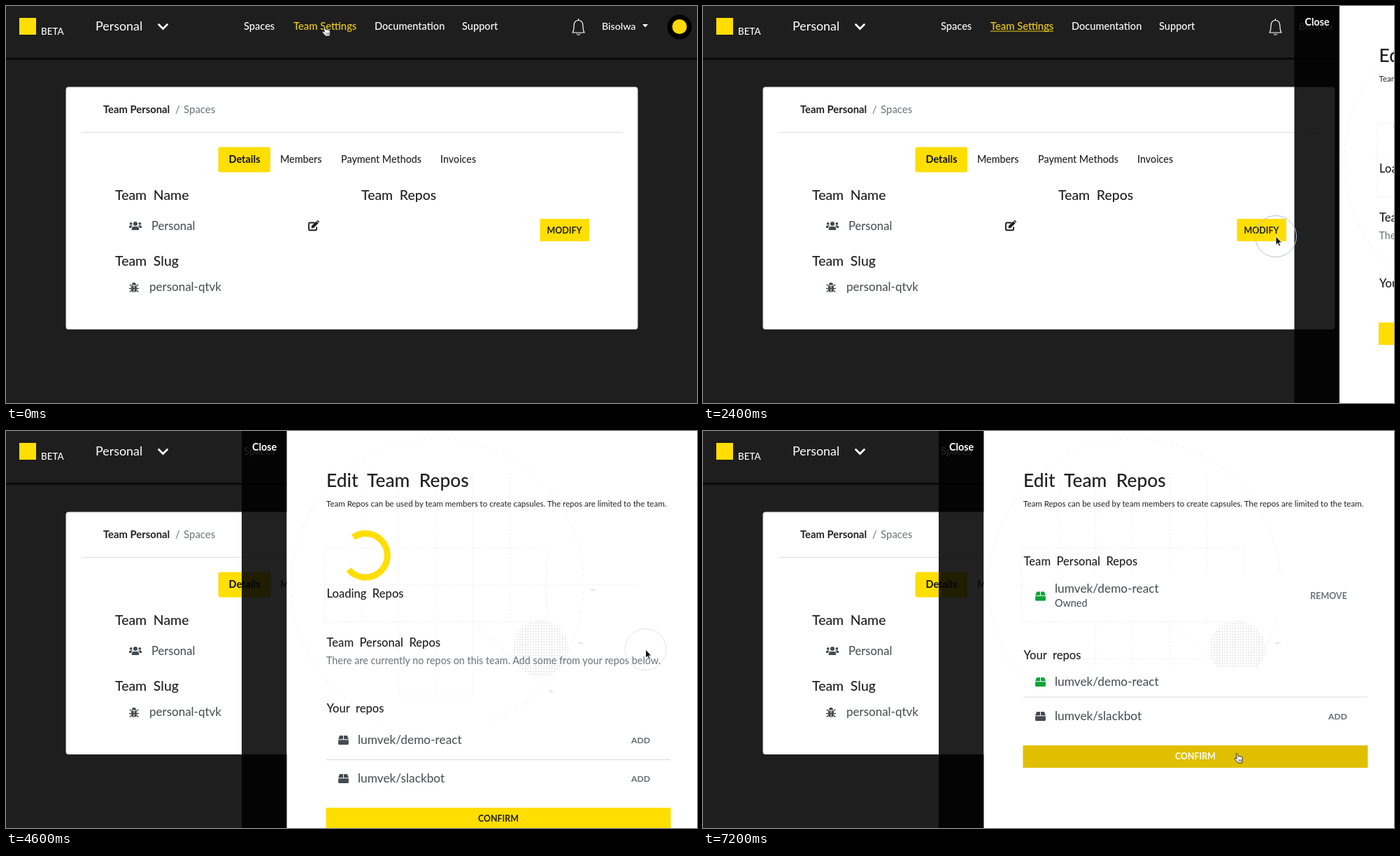
Recreate the animation shown at these times as an HTML page. Size 988 px wide and 567 px high, loop 7400 ms.

```html
<!DOCTYPE html>
<html lang="en">
<head>
<meta charset="utf-8">
<title>Team settings</title>
<style>
  html, body { margin: 0; width: 100%; height: 100%; overflow: hidden; background: #1e1e1e; }
  svg { display: block; width: 988px; height: 567px; }
  text { font-family: Lato, "Open Sans", sans-serif; white-space: pre; }
  .display { font-weight: 500; word-spacing: .25em; }
</style>
</head>
<body>
<svg id="stage" viewBox="0 0 988 567" xmlns="http://www.w3.org/2000/svg">
  <defs>
    <pattern id="dots" width="3.8" height="3.8" patternUnits="userSpaceOnUse">
      <circle cx="1.5" cy="1.5" r=".6" fill="#a8a8a8"/>
    </pattern>
    <linearGradient id="edge" x1="0" y1="0" x2="0" y2="1">
      <stop offset="0" stop-color="#111"/><stop offset=".5" stop-color="#060606"/><stop offset="1" stop-color="#1a1a1a"/>
    </linearGradient>
  </defs>
  <g id="page"></g>
  <g id="drawer"></g>
  <g id="pointer"></g>
</svg>
<script>
const LOOP = 7400, STEP = 200;
const YELLOW = '#ffde00', HOVER = '#e0bf00', INK = '#212121', SLATE = '#454a4f', GREY = '#6c7379';
const $ = id => document.getElementById(id);

const text = (x, y, size, fill, str, extra = '') =>
  `<text x="${x}" y="${y}" font-size="${size}" fill="${fill}" ${extra}>${str}</text>`;
const rect = (x, y, w, h, fill, extra = '') =>
  `<rect x="${x}" y="${y}" width="${w}" height="${h}" fill="${fill}" ${extra}/>`;
const line = (x1, y1, x2, y2, stroke, extra = '') =>
  `<path d="M${x1} ${y1}L${x2} ${y2}" stroke="${stroke}" fill="none" ${extra}/>`;
const at = (x, y, body) => `<g transform="translate(${x} ${y})">${body}</g>`;
const BOLD = 'font-weight="700" ', MEDIUM = 'font-weight="500" ', MID = 'text-anchor="middle"', END = 'text-anchor="end"';
const display = (x, y, size, label) => text(x, y, size, INK, label, 'class="display"');

const usersIcon = `<g fill="${SLATE}"><circle cy="-3" r="3"/><circle cx="-6.3" cy="-3.2" r="1.9"/><circle cx="6.3" cy="-3.2" r="1.9"/>
  <path d="M-5.2 6V4Q-5.2 1-2.3 1H2.3Q5.2 1 5.2 4V6ZM-9 3V1.2Q-9-.5-7.3-.5H-5Q-4.2-.5-3.8 0-6 1-6.2 3ZM9 3V1.2Q9-.5 7.3-.5H5Q4.2-.5 3.8 0 6 1 6.2 3Z"/></g>`;
const editIcon = `<path d="M1-4.5H-5.5Q-7-4.5-7-3V5Q-7 6.3-5.6 6.3H2.5Q4 6.3 4 5V1.5" fill="none" stroke="${INK}" stroke-width="1.9"/>
  <path d="M-3.5 3.3L-3 0 3.7-6.7 6.7-3.7 0 3ZM4.4-7.2L5-7.7Q5.8-8.3 6.6-7.6L7.6-6.6Q8.3-5.8 7.7-5L7.2-4.4Z" fill="${INK}"/>`;
const bugIcon = `<g fill="${SLATE}"><path d="M-3.2-3.5A3.2 3.6 0 0 1 3.2-3.5ZM-3.8-2.4H-.5V7Q-3.8 6.3-3.8 3ZM3.8-2.4H.5V7Q3.8 6.3 3.8 3Z"/>
  <path d="M-6.2-4.2L-3.6-2M6.2-4.2L3.6-2M-7 1.5H7M-6.2 6.3L-3.4 4M6.2 6.3L3.4 4" stroke="${SLATE}" stroke-width="1.5"/></g>`;
const boxIcon = fill => `<path fill="${fill}" d="M-5.4-6.5H-.5V-1.2H-7.4ZM5.4-6.5H.5V-1.2H7.4ZM-7.4-.2H7.4V5.2Q7.4 6.6 6 6.6H-6Q-7.4 6.6-7.4 5.2Z"/>`;
const arrow = `<path d="M0 0V12.2L2.8 9.7 4.7 13.8 6.8 12.9 4.9 8.9H8.6Z" fill="#111" stroke="#fff" stroke-width=".9"/>`;
const hand = `<path d="M1.2 1Q2.4-.2 3.3 1.2L4.4 5Q5.6 4 6.4 5.1 7.7 4.2 8.3 5.4 10 4.8 10.2 6.6L10.4 10.2 9.6 14H4.2L.4 10Q-1.7 7.8-.4 7.2 .8 6.8 2.3 8.4Z" fill="#fff" stroke="#222"/>
  <path d="M5 9V12M6.8 9V12M8.5 9V12" stroke="#222" stroke-width=".7"/>`;

function page(focused, modifyHover) {
  const nav = (x, label) => text(x, 34, 14.6, '#fff', label, MEDIUM);
  const tab = (x, label) => text(x, 223.5, 14.3, INK, label, MEDIUM);
  const heading = (x, y, label) => display(x, y, 19.4, label);
  return rect(0, 0, 988, 567, '#1e1e1e') + rect(0, 73.5, 988, 4, 'url(#edge)')
    + rect(19, 17, 24, 24, YELLOW) + text(50, 40.5, 13.4, '#fff', 'BETA', MEDIUM)
    + text(128, 34.5, 17.9, '#fff', 'Personal')
    + `<path d="M218.5 26.5L224.5 32.5 230.5 26.5" fill="none" stroke="#fff" stroke-width="2.8" stroke-linecap="round"/>`
    + nav(340, 'Spaces') + text(411, 34, 14.8, '#f0d018', 'Team Settings', MEDIUM)
    + (focused ? line(411, 36, 501, 36, '#f0d018', 'stroke-width="1.1"') : '')
    + nav(527, 'Documentation') + nav(652, 'Support')
    + `<path d="M810 38Q812 35 812 29Q812 20.5 818.5 20.5T825 29Q825 35 827 38ZM818.5 20.5V18M816 39.5Q818.5 43 821 39.5" fill="none" stroke="#fff" stroke-width="1.2" stroke-linejoin="round"/>`
    + text(852, 34, 14.2, '#fff', 'Bisolwa', MEDIUM) + `<path d="M910 26H918L914 30.5Z" fill="#fff"/>`
    + `<circle cx="963" cy="30" r="17.5"/><circle cx="963" cy="29.5" r="10.5" fill="#fdd80a"/>`
    + rect(86, 116, 817, 345.5, '#fff', 'rx="3" stroke="#dfdfdf"')
    + text(139, 152.5, 14.8, INK, 'Team Personal', BOLD)
    + text(242, 152.5, 14.6, GREY, '/') + text(254, 152.5, 15, GREY, 'Spaces')
    + line(108, 180.5, 882, 180.5, '#dedede')
    + rect(303.5, 201.5, 74.5, 36, YELLOW, 'rx="3"') + text(341, 223.5, 14.5, '#111', 'Details', BOLD + MID)
    + tab(392, 'Members') + tab(479, 'Payment Methods') + tab(621, 'Invoices')
    + heading(156, 277, 'Team Name') + heading(508, 277, 'Team Repos') + heading(156, 371, 'Team Slug')
    + at(185, 314, usersIcon) + text(208, 319.5, 16.6, SLATE, 'Personal')
    + at(440, 314, editIcon)
    + at(183, 402, bugIcon) + text(205, 407, 17, SLATE, 'personal-qtvk')
    + rect(763.5, 304, 70.5, 32, modifyHover ? HOVER : YELLOW)
    + text(798.5, 324.5, 12.4, modifyHover ? '#fff' : INK, 'MODIFY', BOLD + MID);
}

function backdrop() {
  const faint = 'stroke-dasharray="3 2"', grid = '#f4f4f4';
  let out = `<circle cx="617" cy="220" r="209" fill="none" stroke="#f5f5f5" stroke-dasharray="5 4"/>`;
  for (let x = 508; x <= 720; x += 53) out += line(x + .5, 60, x + .5, x === 561 || x === 614 || x === 667 ? 378 : 272, grid, faint);
  for (const y of [114, 325]) out += line(508, y + .5, 720, y + .5, grid, faint);
  out += line(561, 378.5, 667, 378.5, grid, faint) + line(448, 219.5, 905, 219.5, grid, faint);
  out += `<path d="M455.5 167.5H773V272.5H455.5Z" fill="none" stroke="#efefef" ${faint}/>`;
  out += line(668, 274, 780, 371, grid, faint);
  for (const [x, y] of [[839, 227], [821, 303], [779, 372]])
    out += `<path d="M${x - 4} ${y}h3l2-2-1 4 2-2h3" fill="none" stroke="#d8d8d8" stroke-width=".8"/>`;
  return out + `<circle cx="764" cy="311" r="40" fill="url(#dots)"/>`;
}

function spinner(t) {
  const radius = 31.3;
  const turn = 236 + (t - 4600) * .35;
  const sweep = 213 + 51 * Math.cos((t - 4600) * Math.PI / 1000);
  const point = deg => {
    const a = deg * Math.PI / 180;
    return `${(514 + radius * Math.cos(a)).toFixed(2)} ${(177.7 + radius * Math.sin(a)).toFixed(2)}`;
  };
  return `<path d="M${point(turn)}A${radius} ${radius} 0 ${sweep > 180 ? 1 : 0} 1 ${point(turn + sweep)}" fill="none" stroke="${YELLOW}" stroke-width="9"/>`;
}

const repoRow = (top, bottom, y, name, action, color = SLATE, fill = '#fff') =>
  rect(458, top, 492, bottom - top, fill) + at(482.5, y, boxIcon(color))
  + text(503, y + 5.5, 17.3, SLATE, name)
  + (action ? text(921, y + 4.5, 12.2, '#646a70', action, BOLD + END) : '');

// Which content the drawer holds at a given time.
function contentAt(t) {
  if (t < 3200) return { loading: true, confirmY: 452 };
  if (t < 4400) return { rows: true, confirmY: 422 };
  if (t < 6200) return { loading: true, rows: true, confirmY: 538 };
  return { added: true, confirmY: 449 };
}

function drawer(t, view, over) {
  const dy = view.loading ? 116 : 0;
  const section = (y, label) => display(458.5, y, 16.6, label);
  const first = 'lumvek/demo-react', second = 'lumvek/slackbot', green = '#0ba336';
  let out = rect(337, 0, 64.5, 567, '#000', 'opacity=".87"')
    + text(369.5, 28, 14.3, '#fff', 'Close', BOLD + MID)
    + rect(401.5, 0, 586.5, 567, '#fff') + backdrop()
    + display(458, 80, 26.4, 'Edit Team Repos')
    + text(458, 108, 11.54, INK, 'Team Repos can be used by team members to create capsules. The repos are limited to the team.');
  if (view.loading) out += spinner(t) + section(237.5, 'Loading Repos');
  out += section(192 + dy, 'Team Personal Repos');
  if (view.added) {
    out += rect(458, 205, 492, 62, '#fff') + at(482.5, 236, boxIcon(green))
      + text(503, 230.5, 17.3, SLATE, first) + text(503, 250.5, 14.4, SLATE, 'Owned')
      + text(921, 240, 12.5, GREY, 'REMOVE', BOLD + END)
      + section(325.5, 'Your repos')
      + repoRow(338, 380, 358.5, first, '', green) + repoRow(380, 435, 407.5, second, 'ADD')
      + line(458, 380, 950, 380, '#d9dbdd');
  } else {
    out += text(458, 217 + dy, 14.37, GREY, 'There are currently no repos on this team. Add some from your repos below.')
      + section(286 + dy, 'Your repos');
    if (view.rows) {
      out += repoRow(299 + dy, 353 + dy, 325.5 + dy, first, 'ADD', SLATE, over.row ? '#f2f5f6' : '#fff')
        + repoRow(353 + dy, 408 + dy, 380.5 + dy, second, 'ADD')
        + line(458, 353.5 + dy, 950, 353.5 + dy, '#d9dbdd');
    }
  }
  return out + rect(457.5, view.confirmY, 493, 32, over.confirm ? HOVER : YELLOW)
    + text(704, view.confirmY + 19.5, 12.4, over.confirm ? '#fff' : INK, 'CONFIRM', BOLD + MID);
}

// Keys are [time, x, y, ...]; values between keys are linear.
function along(keys, t) {
  const i = keys.findIndex(k => k[0] > t);
  if (i < 0) return keys[keys.length - 1].slice(1);
  if (i === 0) return keys[0].slice(1);
  const a = keys[i - 1], b = keys[i], p = (t - a[0]) / (b[0] - a[0]);
  return a.slice(1).map((v, j) => v + (b[j + 1] - v) * p);
}
const PATH = [[600, 453, 29], [1400, 644, 180], [1800, 819, 329], [3200, 819, 329], [3600, 887, 345],
  [4000, 912, 322], [4200, 914.5, 312], [4700, 914.5, 312], [5400, 722, 537], [5600, 716, 540],
  [6400, 716, 540], [6600, 722, 532], [7000, 752, 475], [7200, 761, 460]];
const SLIDE = [[2200, 652], [2400, 508.5], [2600, 80], [2800, 0]];
const CLICKS = [2000, 4200];

function render(t) {
  const [x, y] = along(PATH, t), [shift] = along(SLIDE, t);
  const view = contentAt(t), open = t >= 2400;
  const inside = (l, top, r, b) => x >= l && x <= r && y >= top && y <= b;
  const over = {
    link: !open && inside(411, 20, 501, 38),
    modify: t < 2200 && inside(764, 304, 834, 336),
    row: open && view.rows && !view.loading && inside(458, 299, 950, 353),
    add: open && view.rows && !view.loading && inside(890, 310, 926, 340),
    confirm: open && inside(458, view.confirmY, 950, view.confirmY + 32)
  };
  $('page').innerHTML = page(t >= 200, over.modify);
  $('drawer').innerHTML = open ? at(shift, 0, drawer(t, view, over)) : '';

  const click = CLICKS.find(c => t > c && t <= c + 400);
  const ring = click === undefined ? '' :
    `<circle r="${t - click === 200 ? 18 : 29.5}" fill="none" stroke="${click < 3000 ? '#b9bfd9' : '#e4e4e4'}"/>`;
  const pointing = over.link || over.modify || over.add || over.confirm;
  $('pointer').innerHTML = at(x, y, ring + (pointing ? hand : arrow));
}

let shown = -1;
const start = performance.now();
function tick(now) {
  const t = Math.floor((Math.max(0, now - start) % LOOP) / STEP) * STEP;
  if (t !== shown) render(shown = t);
  requestAnimationFrame(tick);
}
tick(start);
</script>
</body>
</html>
```
